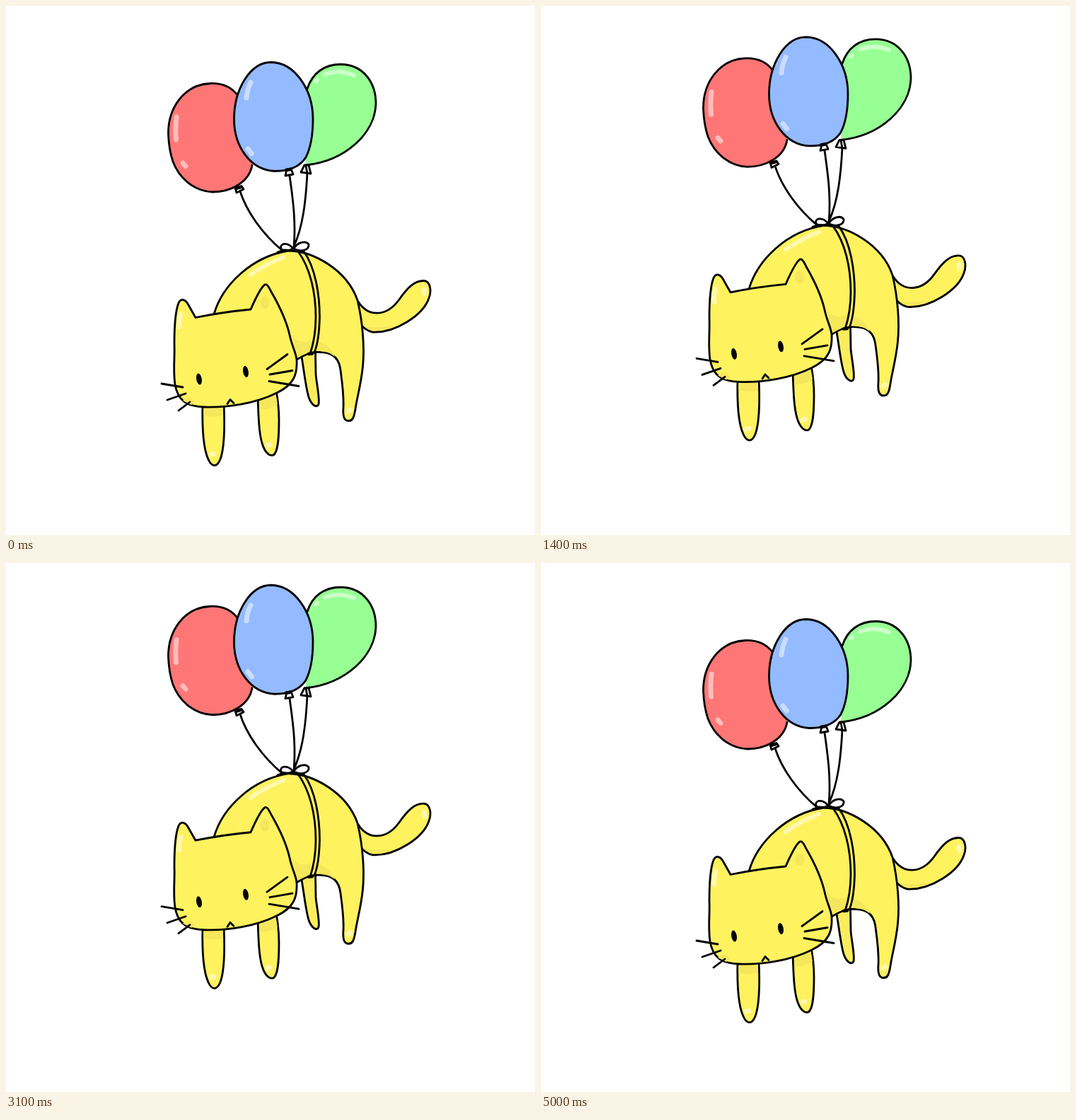
Recreate the animation shown at these times as an HTML page. Size 748x748 px, loop 5.2 s.

```html
<!DOCTYPE html>
<html lang="en">
<head>
<meta charset="utf-8">
<title>Floating cat</title>
<style>
  html, body { margin: 0; width: 100%; height: 100%; overflow: hidden; background: #fff; }
  svg { display: block; width: 100vw; height: 100vh; }
  .ink { fill: none; stroke: #000; stroke-width: 2.8; stroke-linecap: round; stroke-linejoin: round; }
  .bold { stroke-width: 4.5; }
  .cat { fill: #fff25f; }
  .far { fill: #faed5d; }
  .red { fill: #ff7676; }
  .blue { fill: #94baff; }
  .green { fill: #97ff94; }
  .white { fill: #fff; }
  .shade { fill: #f5e75b; }
  .shine { fill: none; stroke: #fff; stroke-opacity: .5; stroke-width: 7; stroke-linecap: round; }
  .thin { stroke-width: 6; }
</style>
</head>
<body>
<svg viewBox="0 0 748 748">
  <g id="scene">
    <!-- balloons -->
    <path class="ink red" d="M328 127C318 113 303 109 289 109.500C251 111 229 145 229.500 181C230 195 232 208 236 220C246 246 268 262 292 263C318 263 344 249 348 225"/>
    <path class="ink green" d="M426 117C433 95 450 82.500 473 82.500C505 82.500 523 108 523 138C522 180 480 219 424 225"/>
    <path class="ink blue" d="M375 79.500C408 80 434 118 434 160C434 184 430 202 424 214C415 228 400 233.500 380 233.500C345 232 322.500 198 322.500 160C322.500 118 345 79.500 375 79.500Z"/>
    <g class="shine">
      <path d="M241 157Q239 173 240.500 189M250 222L254 226.500"/>
      <path d="M346 108Q341 118 340 130M342 202L347.500 209"/>
      <path class="thin" d="M451 97Q470 89 492 98M438 107L440 105"/>
    </g>

    <!-- strings and balloon necks -->
    <path class="ink" d="M331 262C340 290 362 322 391 346M401 240C406 275 410 305 407 342M426 236C424 275 420 312 407 340"/>
    <path class="ink white" d="M324 257L333 254.500L336 259L326 264ZM397 231L403 230L406 238L395 240ZM422 225L428 225L431 237L417 235Z"/>
    <path class="ink bold" d="M325 258L332 256M396 232L402 231"/>
    <path class="ink" d="M424 226L426 236"/>

    <!-- tail and far hind leg -->
    <path class="ink cat" d="M498 418C512 440 538 440 556 415C568 398 578 388 591 388.500C600 389 602 403 598 413C590 437 550 463 518 461C512 460 508 457 503 452"/>
    <path class="shade" d="M506 451C518 458 533 452 548 453C536 458 520 461 510 456Z"/>
    <path class="ink far" d="M418 496C422 520 424 540 428 553C432 565 440 569 442 563C444 555 438.500 530 438 520L437.500 488"/>

    <!-- body -->
    <path class="ink cat" d="M294 436C306 394 348 354 400 346C435 347 482 373 497 416C505 450 507 485 504.500 510C502 535 496 555 494 570C492 582 490 586.500 485 586.500C478 587 476 580 477 568C478 550 475 530 473 515C471 498 462 489.500 445 489.500C432 488 420 494 411 500"/>
    <path class="shade" d="M404 462C410 478 423 475 433 473L429 489L411 498ZM443 475C454 478 461 486 465 496C459 490 450 488 440 488Z"/>
    <path class="ink" d="M413 347C430 370 438 405 438 440C438 465 434 480 430 492M421 347C438 370 443.500 410 443.500 440C443 460 441 478 436 490"/>
    <path class="ink bold" d="M428 492L433 491.500"/>
    <path class="ink white" d="M406 343C399 334 389 335 388.500 341C389 347 399 347 406 343ZM407 343C412 334 424 331 428 337C429 345 418 348 409 344Z"/>
    <path class="ink" d="M384 348L393 345L409 346"/>

    <!-- front legs -->
    <path class="ink cat" d="M278 562C277 600 280 628 286 641C291 652 298 653 303 641C309 625 309.500 595 308 562"/>
    <path class="ink cat" d="M356 552C357 585 358 605 362 618C366 632 373 637 378 635C386 630 386 600 386 585C386 565 384 555 382 544"/>
    <path class="shade" d="M279.500 566H307V578Q293 584 279.500 578ZM358 556L381 547L384 563Q372 572 358.500 570Z"/>

    <!-- head -->
    <path class="ink cat" d="M238 478C238 455 240 430 244 420C248 412 254 416 257 421L268 440.500C290 436 325 431 346 429C353 413 360 398 366 394C369 392 372 398 375 404C386 423 396 443 401 465C404 480 410 490 411 500C412 520 408 535 383 547C353 562 312 568.500 280 567C255 566 243 558 239 535C236 515 239 495 238 478Z"/>
    <ellipse class="shade" cx="366" cy="419" rx="6.500" ry="9"/>
    <path class="shade" d="M250 558Q260 550 267 560L262 564Z"/>
    <path class="ink" d="M369 513.500L398 492.500M373 521L405 515.500M372 530.500L414 537.500M220 534L250 539M228 557L254 548M244 572L260 560M313 562.500L317 556.500L322 561.500"/>
    <g id="open">
      <ellipse cx="273" cy="527.500" rx="3.800" ry="8" transform="rotate(-10 273 527.500)"/>
      <ellipse cx="339" cy="517" rx="3.800" ry="8" transform="rotate(-10 339 517)"/>
    </g>
    <path id="shut" class="ink" d="M267 528.500L276.500 529L270 531.500M346 514.500L336.500 517.500L342 518"/>

    <g class="shine">
      <path class="thin" d="M346 380Q365 366 393 355"/>
      <path d="M247 436Q244 445 245 454M290 634L294 633M370 621L373 620M484 573L487 571M591 401L592 406"/>
    </g>
  </g>
</svg>
<script>
  const LOOP = 5200, STEP = 100, HALF = 25, RISE = 2.54;
  const BLINK = [1000, 1300];
  const el = id => document.getElementById(id);
  const scene = el('scene'), open = el('open'), shut = el('shut');

  function draw(ms) {
    const step = Math.min(Math.floor(ms / STEP), 2 * HALF);
    const lift = RISE * (HALF - Math.abs(step - HALF));
    const closed = ms >= BLINK[0] && ms < BLINK[1];
    scene.setAttribute('transform', `translate(0 ${-lift.toFixed(2)})`);
    open.style.display = closed ? 'none' : '';
    shut.style.display = closed ? '' : 'none';
  }

  const start = performance.now();
  function tick() {
    draw((performance.now() - start) % LOOP);
    requestAnimationFrame(tick);
  }
  tick();
</script>
</body>
</html>
```
